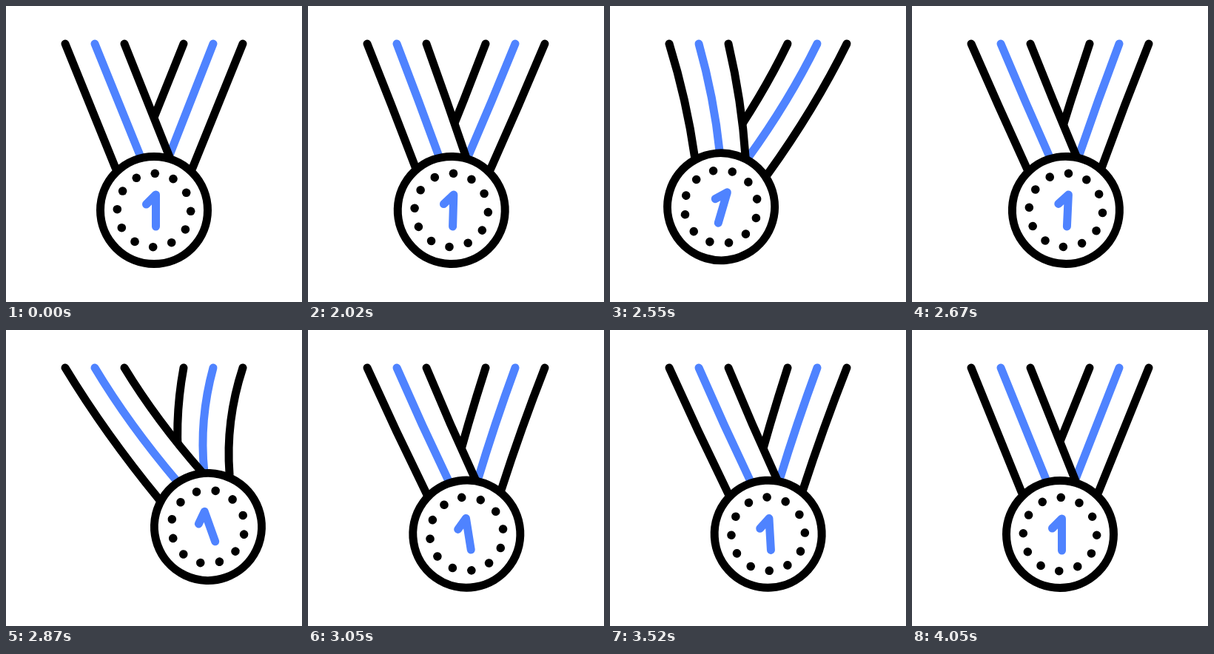
An HTML page with a canvas for the animation above (4.1 s loop, 400 by 400 pixels).

```html
<!DOCTYPE html>
<html lang="en">
<head>
<meta charset="utf-8">
<title>Swinging medal</title>
<style>
html, body { margin: 0; width: 100%; height: 100%; overflow: hidden; background: #fff; }
canvas { display: block; }
</style>
</head>
<body>
<canvas width="400" height="400"></canvas>
<script>
const ctx = document.querySelector('canvas').getContext('2d');
const BLACK = '#000', BLUE = '#4f83ff';
const LOOP = 4100, STEP = 25, TOP = 51;
// [time in ms, sideways offset of the medal]
const keys = [[2000, 0], [2450, -68], [2879, 73], [3205, -36], [3530, 13.7], [4050, 0]];

const launch = u => Math.sin(Math.PI / 2 * (u + 1.1 * u * u * (1 - u)));
const swing = u => (1 - Math.cos(Math.PI * u)) / 2;

function offset(t) {
  const i = keys.findIndex(k => t < k[0]);
  if (i < 1) return 0;
  const [t0, x0] = keys[i - 1], [t1, x1] = keys[i];
  return x0 + (x1 - x0) * (i === 1 ? launch : swing)((t - t0) / (t1 - t0));
}

function stroke(path, color) {
  ctx.strokeStyle = color;
  ctx.stroke(path);
}

function draw(t) {
  const dx = offset(t);
  const cx = 200 + dx, cy = 276 - dx * dx / 530;
  const tilt = -dx / 215, cos = Math.cos(tilt), sin = Math.sin(tilt);
  // The ribbons narrow a little once the medal leaves its rest
  const pinch = Math.min(1, Math.abs(dx) / 8);

  // Cord from the top edge to a point that turns with the medal
  function cord(x, ax, ay, bend) {
    const ex = cx + ax * cos - ay * sin, ey = cy + ax * sin + ay * cos;
    return { x, ex, ey, mx: (x + ex) / 2 - bend * dx, my: (TOP + ey) / 2 };
  }
  function cordPath(c) {
    const p = new Path2D();
    p.moveTo(c.x, TOP);
    p.quadraticCurveTo(c.mx, c.my, c.ex, c.ey);
    return p;
  }

  ctx.fillStyle = '#fff';
  ctx.fillRect(0, 0, 400, 400);
  ctx.lineWidth = 11;
  ctx.lineCap = ctx.lineJoin = 'round';

  // Right ribbon
  stroke(cordPath(cord(240, -21 + 7 * pinch, -73, 0.16)), BLACK);
  stroke(cordPath(cord(280, 20, -72, 0.18)), BLUE);
  stroke(cordPath(cord(320, 52 - pinch, -57, 0.2)), BLACK);

  // Left ribbon covers the right one
  const outer = cord(80, -52 + 2 * pinch, -57, 0.13);
  const inner = cord(160, 21 - 4 * pinch, -72, 0.13);
  const cloth = cordPath(outer);
  cloth.lineTo(inner.ex, inner.ey);
  cloth.quadraticCurveTo(inner.mx, inner.my, inner.x, TOP);
  ctx.fill(cloth);
  stroke(cordPath(outer), BLACK);
  stroke(cordPath(cord(120, -18 - pinch, -72, 0.13)), BLUE);
  stroke(cordPath(inner), BLACK);

  // Medal, its face turning a little late
  const lag = Math.min(35, Math.max(0, t - 2000) * 0.05);
  ctx.save();
  ctx.translate(cx, cy);
  ctx.rotate(-0.28 * offset(t - lag) * Math.PI / 180);
  const disc = new Path2D();
  disc.arc(0, 0, 72.5, 0, 2 * Math.PI);
  ctx.fill(disc);
  stroke(disc, BLACK);

  ctx.fillStyle = BLACK;
  for (let i = 0; i < 12; i++) {
    const a = (i * 30 + 1.5) * Math.PI / 180;
    ctx.beginPath();
    ctx.arc(49.7 * Math.sin(a), -49.7 * Math.cos(a), 5.8, 0, 2 * Math.PI);
    ctx.fill();
  }
  stroke(new Path2D('M-10.5-8 2.5-21V22'), BLUE);
  ctx.restore();
}

const start = performance.now();
function tick() {
  const t = (performance.now() - start) % LOOP;
  draw(Math.floor((t + 5) / STEP) * STEP);
  requestAnimationFrame(tick);
}
tick();
</script>
</body>
</html>
```
